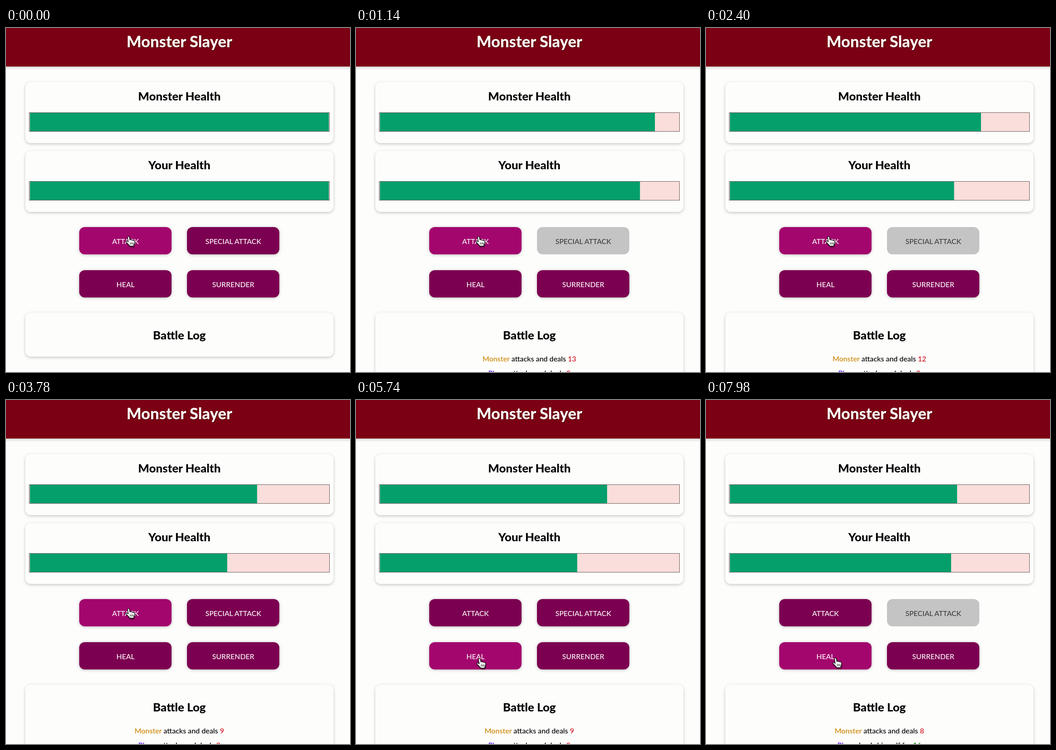
These frames come from a looping animation (747 by 750 pixels, 8 s). An HTML page:

```html
<!DOCTYPE html>
<html lang="en">
<head>
<meta charset="utf-8">
<title>Monster Slayer</title>
<style>
  html, body { margin: 0; width: 100%; height: 100%; overflow: hidden; background: #fdfdfc; }
  svg { display: block; width: 100%; height: 100%; }
  text { font: 500 15.8px Lato, "Open Sans", sans-serif; text-anchor: middle; white-space: pre; }
  .title { font-size: 34px; font-weight: 800; fill: #fdfdf8; filter: drop-shadow(1px 1px 1px #0006); }
  .head { font-size: 25.5px; font-weight: 800; }
  .raised { filter: drop-shadow(0 2px 3px #00000038); }
  .card { fill: #fdfdfc; }
  .button rect { fill: #7c0051; filter: drop-shadow(0 1px 3px #00000040); }
  .button text { font-size: 15.6px; fill: #fcf8fa; }
  .button.hover rect { fill: #a3066d; }
  .button.off rect { fill: #c4c4c4; filter: none; }
  .button.off text { fill: #3f3f3f; }
  .monster { fill: #cc8400; }
  .player { fill: #5a12f0; }
  .damage { fill: #d0101c; }
  .healing { fill: #168a1c; }
</style>
</head>
<body>
<svg id="stage" viewBox="0 0 747 750" preserveAspectRatio="none"></svg>
<script>
const LOOP = 8000;
const CENTER = 376.5;

// Game state from each moment on: health in percent, the round, the last log entries.
const rounds = [
  { at: 0, monster: 100, player: 100, round: 0 },
  { at: 280, monster: 92, player: 87, round: 1, hit: 13, deal: 8 },
  { at: 1760, monster: 84, player: 75, round: 2, hit: 12, deal: 8 },
  { at: 3520, monster: 76, player: 66, round: 3, hit: 9, deal: 8 },
  { at: 7060, monster: 76, player: 74, round: 4, hit: 8, heal: 16 }
];

// Pointer path: time, x, y
const path = [
  [0, 260, 454], [5080, 260, 454], [5200, 260, 458], [5680, 262, 563],
  [7480, 262, 563], [7820, 275, 562], [LOOP, 275, 562]
];

const stage = document.getElementById("stage");

function add(parent, name, attrs, text) {
  const node = document.createElementNS("http://www.w3.org/2000/svg", name);
  for (const key in attrs) node.setAttribute(key, attrs[key]);
  if (text !== undefined) node.textContent = text;
  parent.append(node);
  return node;
}

function label(text, y, kind, x = CENTER, parent = stage) {
  return add(parent, "text", { x, y, class: kind }, text);
}

function card(y, height) {
  return add(stage, "rect", { x: 42, y, width: 669, height, rx: 12, class: "card raised" });
}

function healthCard(name, y) {
  card(y, 133);
  label(name, y + 40, "head");
  add(stage, "rect", {
    x: 50.5, y: y + 66.5, width: 652, height: 41, fill: "#fadedb", stroke: "#6b5c5e"
  });
  return add(stage, "rect", { x: 52, y: y + 67, width: 649, height: 40, fill: "#059f6c" });
}

function button(name, x, y) {
  const group = add(stage, "g", { class: "button" });
  add(group, "rect", { x, y, width: 200.5, height: 59.5, rx: 12 });
  label(name, y + 36.5, "", x + 100.5, group);
  return { group, x, y };
}

function logLine(y) {
  const line = label("", y, "");
  return parts => line.replaceChildren(
    ...parts.map(([text, kind]) => add(line, "tspan", { class: kind }, text)));
}

add(stage, "rect", { x: -20, y: -20, width: 787, height: 104, fill: "#7b0014", class: "raised" });
label("Monster Slayer", 42, "title");
const monsterBar = healthCard("Monster Health", 118);
const playerBar = healthCard("Your Health", 268);
const attack = button("ATTACK", 159, 434);
const special = button("SPECIAL ATTACK", 393, 434);
const heal = button("HEAL", 159, 528);
const surrender = button("SURRENDER", 393, 528);
const logCard = card(620.5, 96);
label("Battle Log", 678.5, "head");
const firstLine = logLine(726.5);
const secondLine = logLine(758);

const hand = add(stage, "g", { style: "filter: drop-shadow(1px 2px 1px #0007)" });
add(hand, "path", {
  d: "M4 2.5C4 .2 7.6 0 8 2.3L9 8C10 7 12 7.2 12.3 8.6C13.4 7.6 15.2 8 15.5 9.4" +
     "C16.7 8.5 18.9 9 19.2 11C19.7 15 18.8 16.5 17.7 18.5L17.5 21.5H8.5L8 20" +
     "C5 17 3 14.5 1 12.7C-.3 11 1.6 9.5 3.4 10.6L5.6 12.2Z",
  fill: "#fff", stroke: "#111", "stroke-width": 1.3, "stroke-linejoin": "round"
});
add(hand, "path", {
  d: "M10 13.5v4.5M12.8 13.5v4.5M15.6 13.5v4.5", stroke: "#111", "stroke-width": 1.1
});

function pointerAt(time) {
  const next = Math.max(1, path.findIndex(step => step[0] > time));
  const [t0, x0, y0] = path[next - 1];
  const [t1, x1, y1] = path[next];
  const p = (time - t0) / (t1 - t0);
  const eased = p * p * (3 - 2 * p);
  return [x0 + (x1 - x0) * eased, y0 + (y1 - y0) * eased];
}

let shown;
function showRound(state) {
  if (state === shown) return;
  shown = state;
  monsterBar.setAttribute("width", 6.49 * state.monster);
  playerBar.setAttribute("width", 6.49 * state.player);
  special.group.classList.toggle("off", state.round % 3 !== 0);
  logCard.setAttribute("height", state.round ? 200 : 96);
  firstLine(state.round ? [
    ["Monster", "monster"], [" attacks and deals ", ""], [state.hit, "damage"]
  ] : []);
  secondLine(!state.round ? [] : state.heal ? [
    ["Player", "player"], [" heals himself for ", ""], [state.heal, "healing"]
  ] : [
    ["Player", "player"], [" attacks and deals ", ""], [state.deal, "damage"]
  ]);
}

function draw(time) {
  showRound(rounds.findLast(state => state.at <= time));
  const [x, y] = pointerAt(time);
  hand.setAttribute("transform", `translate(${x} ${y})`);
  for (const { group, x: left, y: top } of [attack, special, heal, surrender]) {
    const inside = x + 6 > left && x + 6 < left + 201 && y + 1 > top && y + 1 < top + 60;
    group.classList.toggle("hover", inside);
  }
}

const start = performance.now();
function tick() {
  draw((performance.now() - start) % LOOP);
  requestAnimationFrame(tick);
}
tick();
</script>
</body>
</html>
```
